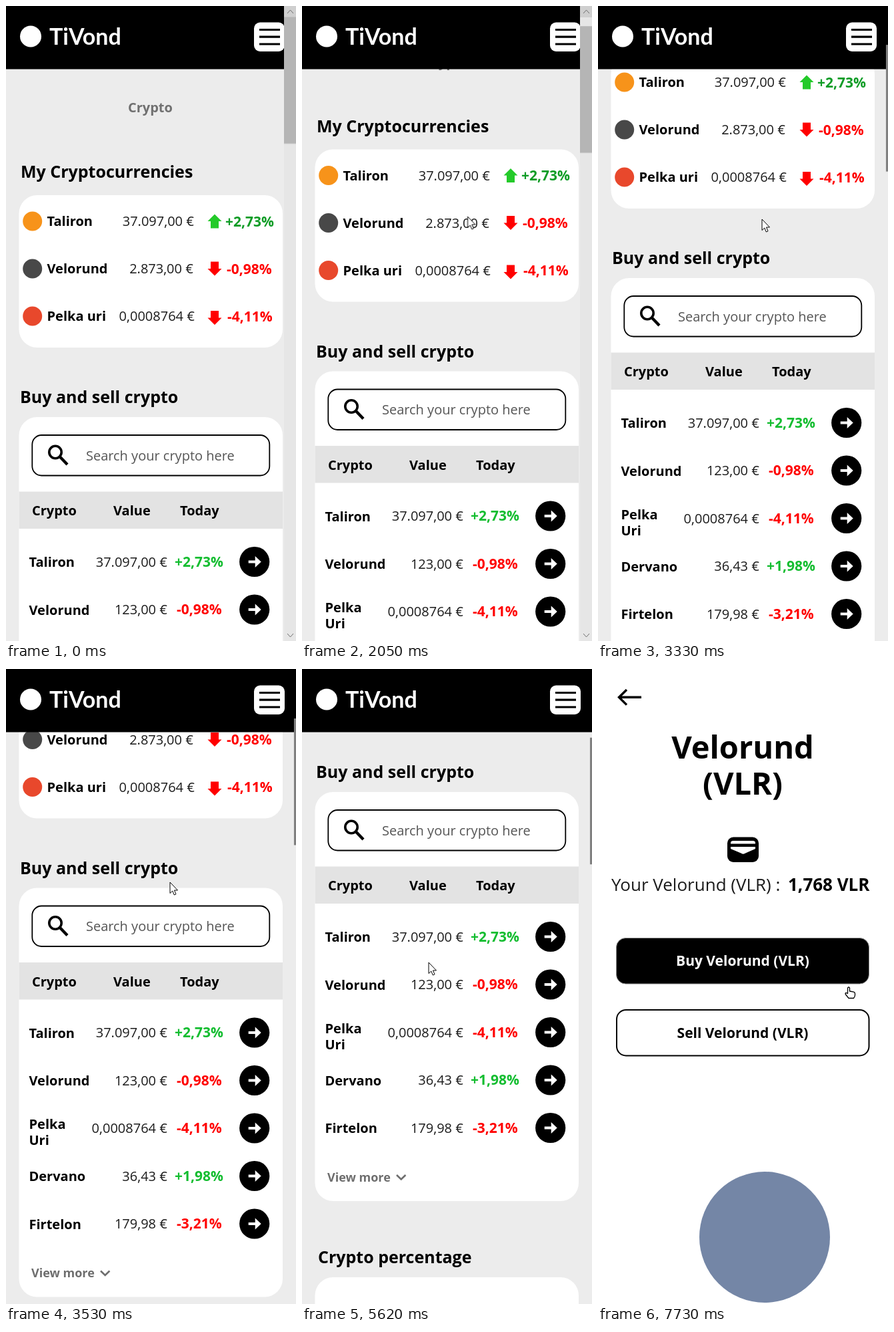
An HTML page for the animation above (8000 ms loop, 435 by 950 pixels).

```html
<!DOCTYPE html>
<html lang="en">
<head>
<meta charset="utf-8">
<title>Crypto wallet</title>
<style>
@property --scroll { syntax: "<number>"; inherits: true; initial-value: 0; }
html, body { margin: 0; width: 100%; height: 100%; overflow: hidden; background: #ececec; }
svg {
  display: block; width: 100%; height: 100%;
  font: 700 20px "Open Sans", "Noto Sans", sans-serif;
  animation: scroll 8s step-end infinite;
}
.h { font-size: 25px; }
.regular { font-weight: 400; }
.pct { font-size: 21px; }
.end { text-anchor: end; }
.mid { text-anchor: middle; }
.line { fill: none; stroke: #000; }
.white { fill: #fff; }

#page { transform: translateY(calc(var(--scroll) * -1px)); }
#thumb { transform: translateY(calc(16.5px + var(--scroll) * .2px)); }
#thumb rect { transform-origin: 435px 0; animation: thin 8s infinite; }
#track { transform-origin: 435px 0; animation: track 8s infinite; }
#bars { animation: bars 8s step-end infinite; }
#detail { animation: dissolve 8s step-end infinite; }
#cursor { animation: move 8s step-end infinite; }
#arrow { animation: arrow 8s step-end infinite; }
#hand { animation: hand 8s step-end infinite; }

@keyframes scroll {
  0% { --scroll: 0; }
  25.625% { --scroll: 68.5; }
  26.5% { --scroll: 112; }
  27.375% { --scroll: 135; }
  28.25% { --scroll: 143.5; }
  41.625% { --scroll: 208; }
  42.5% { --scroll: 256; }
  43.375% { --scroll: 279; }
  44.125% { --scroll: 287.5; }
  58.125% { --scroll: 331; }
  59% { --scroll: 377; }
  59.875% { --scroll: 410; }
  60.75% { --scroll: 426; }
  61.5%, 100% { --scroll: 431; }
}
@keyframes thin {
  0%, 29.125% { transform: scaleX(1); fill: #b5b5b5; animation-timing-function: steps(4, jump-start); }
  32.5%, 100% { transform: scaleX(.17); fill: #808080; }
}
@keyframes track {
  0%, 29.125% { transform: scaleX(1); opacity: 1; animation-timing-function: steps(4, jump-start); }
  32.5%, 100% { transform: scaleX(.17); opacity: 0; }
}
@keyframes bars { 0% { opacity: 1; } 89.75%, 100% { opacity: 0; } }
@keyframes dissolve {
  0% { opacity: 0; }
  89.75% { opacity: .004; }
  90.625% { opacity: .01; }
  91.5% { opacity: .02; }
  92.375% { opacity: .035; }
  93.125% { opacity: .055; }
  94% { opacity: .19; }
  94.875% { opacity: .43; }
  95.75% { opacity: .74; }
  96.625%, 100% { opacity: 1; }
}
@keyframes move {
  0%, 5.75% { transform: translate(357px, 769px); animation-timing-function: steps(11); }
  15.375% { transform: translate(255px, 346px); }
  16.25% { transform: translate(254px, 341px); animation-timing-function: steps(5); }
  20.5% { transform: translate(248.5px, 315px); }
  29.125% { transform: translate(246px, 319px); }
  65% { transform: translate(238px, 336px); animation-timing-function: steps(6); }
  70.25% { transform: translate(190px, 439px); }
  71.125% { transform: translate(184px, 465px); }
  72% { transform: translate(200px, 487px); }
  72.875% { transform: translate(238px, 498px); }
  73.75% { transform: translate(290px, 499px); }
  74.625% { transform: translate(335px, 496px); }
  75.5% { transform: translate(347px, 491px); }
  76.375% { transform: translate(358px, 486px); }
  77.25% { transform: translate(367px, 481px); }
  78.125% { transform: translate(373px, 478px); }
  79%, 100% { transform: translate(376px, 476px); }
}
@keyframes arrow {
  0% { opacity: 0; }
  5.75% { opacity: 1; }
  76.375% { opacity: 0; }
  85.625% { opacity: 1; }
  94.875%, 100% { opacity: 0; }
}
@keyframes hand {
  0% { opacity: 0; }
  76.375% { opacity: 1; }
  85.625% { opacity: 0; }
  94.875%, 100% { opacity: 1; }
}
</style>
</head>
<body>
<svg viewBox="0 0 435 950" preserveAspectRatio="none">
  <rect width="435" height="950" fill="#ececec"/>

  <g id="page">
    <text x="183" y="159" fill="#707070">Crypto</text>
    <text class="h" x="22" y="257">My Cryptocurrencies</text>
    <rect class="white" x="19.5" y="283" width="395.5" height="228" rx="27"/>
    <g id="owned"></g>

    <text class="h" x="21" y="594">Buy and sell crypto</text>
    <rect class="white" x="19.5" y="615" width="395.5" height="612" rx="27"/>
    <rect class="line" x="39.3" y="642" width="356" height="60.5" rx="14" stroke-width="1.8"/>
    <circle class="line" cx="74" cy="667.5" r="9.2" stroke-width="3.6"/>
    <path class="line" d="M80.5 674L92 686" stroke-width="4.4"/>
    <text class="regular" x="120" y="679.5" fill="#555">Search your crypto here</text>
    <rect x="19.5" y="726.5" width="395.5" height="55.5" fill="#e3e3e3"/>
    <text x="39" y="762">Crypto</text>
    <text x="161" y="762">Value</text>
    <text x="261" y="762">Today</text>
    <g id="market"></g>
    <text x="38" y="1197.5" fill="#6e6e6e" font-size="18">View more</text>
    <path class="line" d="M142 1188l6.7 6.5l6.7 -6.5" style="stroke:#6e6e6e" stroke-width="2.6"/>

    <text class="h" x="24" y="1320">Crypto percentage</text>
    <rect class="white" x="19.5" y="1341" width="395.5" height="300" rx="27"/>
  </g>

  <rect width="435" height="94.5"/>
  <circle class="white" cx="37" cy="45.5" r="16"/>
  <text class="white" x="65" y="58" style="font:700 34px Lato, sans-serif">TiVond</text>
  <rect class="white" x="372" y="24.5" width="46" height="43.5" rx="9"/>
  <path class="line" d="M380 35.5h31M380 46.2h31M380 57h31" stroke-width="3.2"/>

  <g id="bars">
    <g id="track">
      <rect x="417" width="18" height="950" fill="#e6e6e6"/>
      <rect x="417" width="18" height="17" fill="#cfcfcf"/>
      <path class="line" d="M422 11l4.5 -5l4.5 5M422 939l4.5 5l4.5 -5" style="stroke:#707070"/>
    </g>
    <g id="thumb"><rect x="417" width="18" height="189.5"/></g>
  </g>

  <g id="detail">
    <rect class="white" width="435" height="950"/>
    <path class="line" d="M65 42.3H32M43 31L31.5 42.3L43 53.6" stroke-width="3.4"/>
    <g class="mid" font-size="47">
      <text x="217" y="134">Velorund</text>
      <text x="217" y="188">(VLR)</text>
    </g>
    <rect x="194" y="251.5" width="47" height="37.5" rx="9"/>
    <path class="white" d="M199 260q0 -3 4 -3h29q4 0 4 3v1.5h-37zM199 266h37v3l-17 7.5q-2 .5 -4 -.7l-16 -6.8z"/>
    <text class="regular" x="20" y="331.5" font-size="26" fill="#1c1c1c">Your Velorund (VLR) :</text>
    <text x="285" y="331.5" font-size="26">1,768 VLR</text>
    <rect x="27.5" y="402.5" width="379" height="68.5" rx="14" stroke="#8a8a8a"/>
    <text class="mid pct white" x="217" y="443.5">Buy Velorund (VLR)</text>
    <rect class="line" x="28" y="510" width="378.5" height="68.5" rx="14" stroke-width="2"/>
    <text class="mid pct" x="217" y="551.5">Sell Velorund (VLR)</text>
    <circle cx="250" cy="850" r="98" fill="#7486a6"/>
  </g>

  <g id="cursor" fill="#fff" stroke="#000" stroke-linejoin="round">
    <path id="arrow" d="M0 0V16.5L3.8 13L6.3 19L9 17.8L6.5 12H11.5Z"/>
    <path id="hand" stroke-width="1.3" d="M-1.5 9.5V1.5a1.5 1.5 0 0 1 3 0V6l6 1.2q2 .5 2 2.5v2q0 2.5 -2 4.8h-7.5l-4.5 -5.5q-1.2 -2.3 .8 -2.5z"/>
  </g>
</svg>
<script>
const text = (cls, x, y, str, fill = "#000") =>
  `<text class="${cls}" x="${x}" y="${y}" fill="${fill}">${str}</text>`;
const priceText = (end, y, str) => text("regular end", end, y, str, "#1c1c1c");
const isUp = pct => pct[0] === "+";

// name, icon colour, price, price end, change, change start, arrow offset
const owned = [
  ["Taliron", "#f7931a", "37.097,00 €", 282, "+2,73%", 329, 0],
  ["Velorund", "#484848", "2.873,00 €", 281, "-0,98%", 331, 0],
  ["Pelka uri", "#e8482c", "0,0008764 €", 283, "-4,11%", 332, 2.5],
];
document.getElementById("owned").innerHTML = owned.map(
  ([name, icon, price, end, pct, x, shift], i) => {
    const y = 322 + i * 71, up = isUp(pct);
    return `<circle cx="39.7" cy="${y}" r="14.5" fill="${icon}"/>` +
      text("", 61.5, y + 7, name) +
      priceText(end, y + 7, price) +
      `<path transform="translate(313 ${y + shift}) scale(1 ${up ? 1 : -1})"
        d="M0 -10.5L10.5 0H6V10.5H-6V0H-10.5Z" fill="${up ? "#24ca2a" : "#f00"}"/>` +
      text("pct", x, y + 7.5, pct, up ? "#0f9c26" : "#f00");
  }).join("");

const market = [
  ["Taliron", "37.097,00 €", "+2,73%"],
  ["Velorund", "123,00 €", "-0,98%"],
  ["Pelka Uri", "0,0008764 €", "-4,11%"],
  ["Dervano", "36,43 €", "+1,98%"],
  ["Firtelon", "179,98 €", "-3,21%"],
];
document.getElementById("market").innerHTML = market.map(([name, price, pct], i) => {
  const y = 831.5 + i * 71.5, up = isUp(pct), words = name.split(" ");
  const top = words.length > 1 ? y + 1 : y + 7.5;
  return words.map((w, k) => text("", 34.5, top + k * 24, w)).join("") +
    priceText(242, y + 7, price) +
    text("pct", up ? 253 : 256, y + 7, pct, up ? "#14bd30" : "#f00") +
    `<g transform="translate(372.7 ${y})"><circle r="22.6"/>
      <path class="white" d="M-9 -2H1V-8.5L10 0L1 8.5V2H-9Z"/></g>`;
}).join("");
</script>
</body>
</html>
```
